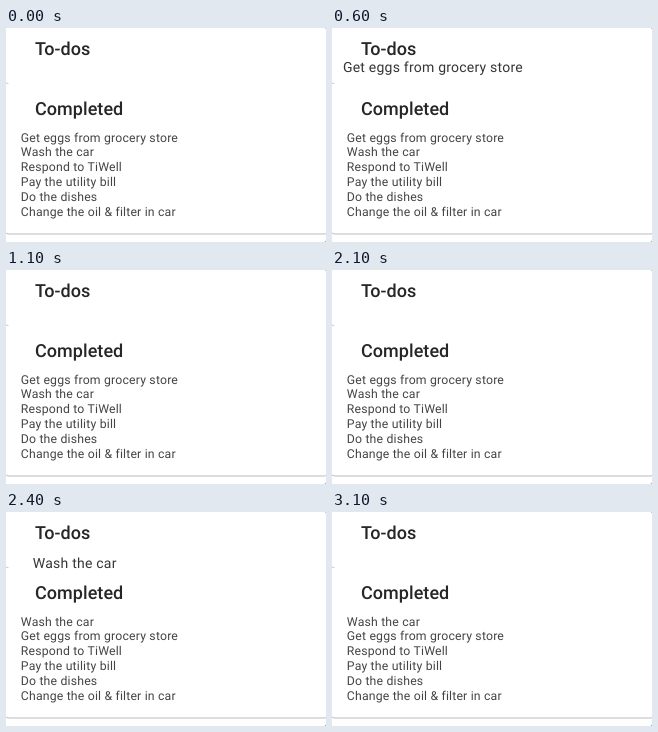
An HTML page for the animation above (3.3 s loop, 320 px wide and 214 px high).

```html
<!DOCTYPE html>
<html lang="en">
<head>
<meta charset="utf-8">
<title>To-do drag and drop</title>
<style>
  html, body { margin: 0; width: 100%; height: 100%; overflow: hidden; background: #888; }
  svg { display: block; width: 320px; height: 214px; background: #fff; border-radius: 0 2px 2px 0; }
  text { font: 12.28px Roboto, sans-serif; letter-spacing: .18px; fill: #444; text-rendering: geometricPrecision; }
  .title { font-size: 18px; font-weight: 500; letter-spacing: .05px; fill: #262626; }
  #ghost { font-size: 14.03px; letter-spacing: .22px; fill: #363636; }
  .card { fill: #fff; filter: drop-shadow(0 1px .7px #0004); }
</style>
</head>
<body>
<svg viewBox="0 0 320 214">
  <rect class="card" x="-.5" y="-6" width="322" height="61.5" rx="3.5"/>
  <rect class="card" x="-.5" y="55.5" width="322" height="150" rx="3.5"/>
  <rect x="3" y="50" width="317" height="12" fill="#fff"/>
  <text class="title" x="29" y="27">To-dos</text>
  <text class="title" x="29" y="87">Completed</text>
  <g id="list"></g>
  <text id="ghost"></text>
</svg>
<script>
const LOOP = 3300, STEP = 100, SWAP_TIME = 2200;
const items = ['Get eggs from grocery store', 'Wash the car', 'Respond to TiWell',
  'Pay the utility bill', 'Do the dishes', 'Change the oil & filter in car'];

// Each drag path is a list of [time, x, baseline].
const drags = [
  { label: items[0], end: 1100, path: [[400, 12.8, 96], [500, 11.6, 64], [600, 10.9, 44.2], [800, 10.9, 25.2]] },
  { label: items[1], end: 2900, path: [[2200, 19, 108], [2300, 24, 78], [2400, 26.8, 56.2], [2600, 30, 38.2], [2700, 30.2, 33]] }
];

const ghost = document.getElementById('ghost');
const rows = items.map((_, i) => {
  const row = document.createElementNS('http://www.w3.org/2000/svg', 'text');
  row.setAttribute('x', 14.8);
  row.setAttribute('y', 113.5 + i * 14.8);
  document.getElementById('list').append(row);
  return row;
});

function pointAt(path, t) {
  const next = path.findIndex(p => p[0] > t);
  if (next < 0) return path[path.length - 1];
  const a = path[next - 1], b = path[next], k = (t - a[0]) / (b[0] - a[0]);
  return a.map((v, i) => v + (b[i] - v) * k);
}

function draw(now) {
  const t = Math.floor(now % LOOP / STEP) * STEP;
  const swapped = t >= SWAP_TIME;
  rows.forEach((row, i) => {
    row.textContent = items[swapped && i < 2 ? 1 - i : i];
  });
  const drag = drags.find(d => t >= d.path[0][0] && t < d.end);
  ghost.textContent = drag ? drag.label : '';
  if (drag) {
    const [, x, y] = pointAt(drag.path, t);
    ghost.setAttribute('x', x);
    ghost.setAttribute('y', y);
  }
  requestAnimationFrame(() => draw(performance.now()));
}
draw(0);
</script>
</body>
</html>
```
